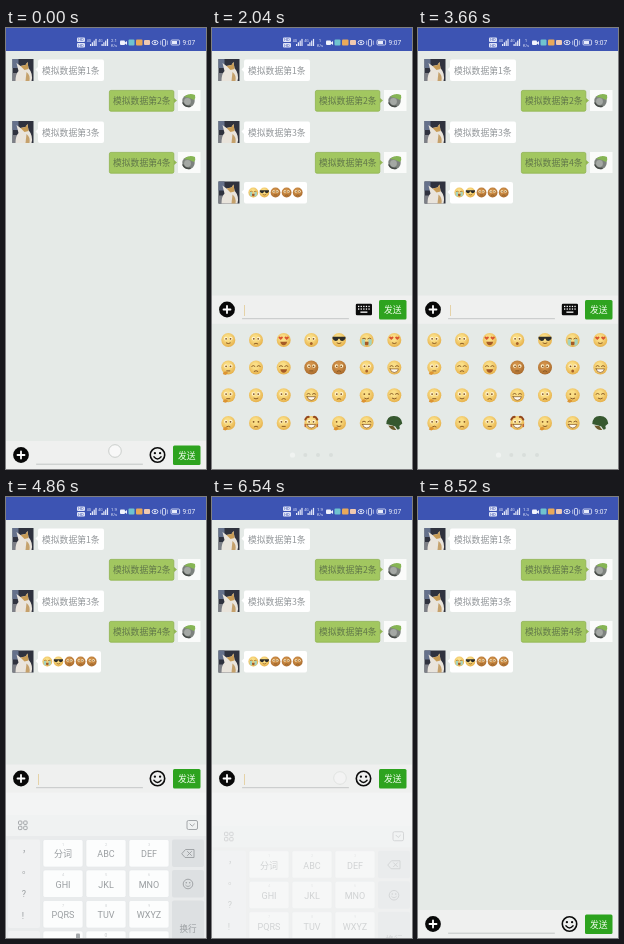
An HTML page that plays this animation: 200 px wide and 441 px high, repeating every 8580 ms.

```html
<!DOCTYPE html>
<html lang="zh-CN">
<head>
<meta charset="utf-8">
<title>聊天表情面板</title>
<style>
html, body { margin: 0; width: 100%; height: 100%; overflow: hidden; background: #e5eae7; }
svg { display: block; width: 200px; height: 441px; }
text { font-family: "Noto Sans CJK SC", "Noto Sans CJK", "Noto Sans", sans-serif; }
.num { font-family: Roboto, "Noto Sans", sans-serif; }
.key { font-family: Roboto, "Noto Sans CJK SC", "Noto Sans CJK", sans-serif; }
</style>
</head>
<body>
<svg id="stage" viewBox="0 0 200 441"></svg>
<script>
const LOOP = 8580;
const COLS = [16.3, 44, 71.7, 99.3, 127, 154.7, 182.3];
const ROWS = [312, 339.5, 367.3, 395];
const BAR_DROP = 145.5;

// Each panel change: start time and what fills the lower part.
const PANELS = [[0, 'none'], [180, 'keys'], [720, 'faces'], [2280, 'keys'], [3120, 'faces'],
  [4560, 'keys'], [5640, 'faces'], [6450, 'keys'], [7440, 'faces'], [8280, 'none']];
// Finger contacts: start, end, x, y.
const TAPS = [[0, 100, 109, 423], [600, 720, 151, 281], [1020, 1140, 154, 312], [1170, 1260, 127, 312],
  [1350, 1440, 99, 339], [1470, 1560, 127, 339], [1590, 1680, 127, 339], [1710, 1800, 181, 281],
  [2160, 2280, 151, 281], [3000, 3120, 151, 281], [4440, 4560, 151, 281],
  [5520, 5640, 151, 281], [6360, 6480, 128, 281], [7320, 7440, 151, 281], [8160, 8280, 100, 220]];
const TYPED = [1140, 1260, 1440, 1560, 1680];
const SENT = 1800;
const SPEED = [[0, '2.1'], [1000, '2.3'], [1900, '1'], [4300, '1.9'], [7000, '1.3']];

// Eyes, mouth, then optional extra for every cell of the emoji grid.
const GRID = [
  'ws wf hb wo gs cbT hs',
  'wnH cf cb wnB wfB wo ct',
  'wnH ws wf ct wf dsH cs',
  'wfH df wn wtM dsH ct dnC'
].map(r => r.split(' '));
const MESSAGE = ['cbT', 'gs', 'wnB', 'wfB', 'wfB'];

const rect = (x, y, w, h, fill, r = 0, more = '') =>
  `<rect x="${x}" y="${y}" width="${w}" height="${h}" rx="${r}" fill="${fill}" ${more}/>`;
const disc = (x, y, r, fill, more = '') => `<circle cx="${x}" cy="${y}" r="${r}" fill="${fill}" ${more}/>`;
const path = (d, fill, stroke = 'none', w = 1) =>
  `<path d="${d}" fill="${fill}" stroke="${stroke}" stroke-width="${w}" stroke-linecap="round"/>`;
const line = (d, color, w = 1) => path(d, 'none', color, w);
const text = (x, y, s, size, fill, more = '') =>
  `<text x="${x}" y="${y}" font-size="${size}" fill="${fill}" ${more}>${s}</text>`;
const mid = (x, y, s, size, fill, more = '') => text(x, y, s, size, fill, `text-anchor="middle" ${more}`);
const group = (id, body) => `<g id="${id}">${body}</g>`;

const INK = '#80521f';
const EYES = {
  d: disc(-2.4, -1.2, .9, INK) + disc(2.4, -1.2, .9, INK),
  c: line('M-4.3-1.2q1.6-1.6 3.2 0M1.1-1.2q1.6-1.6 3.2 0', INK, .9),
  w: disc(-2.5, -1.4, 1.8, '#fff3cf') + disc(2.5, -1.4, 1.8, '#fff3cf') +
    disc(-2.2, -1.2, .9, INK) + disc(2.2, -1.2, .9, INK),
  h: path('M-3 .1l-2.3-2.4q1-2 2.3-.4q1.5-1.6 2.3.4zM3 .1l-2.3-2.4q1-2 2.3-.4q1.5-1.6 2.3.4z', '#d9552f'),
  g: path('M-6.5-3.2H6.5V-1.4Q5.4 1 3.2 1Q1 1 .6-1.3H-.6Q-1 1-3.2 1Q-5.4 1-6.5-1.4z', '#2d2d2a')
};
const MOUTHS = {
  s: line('M-2 3q2 1.4 4 0', INK, .9),
  f: line('M-1.8 3.8q1.8-1.4 3.6 0', INK, .9),
  n: line('M-1.6 3.4h3.2', INK, .9),
  o: `<ellipse cy="3.5" rx="1.4" ry="1.6" fill="#a5602a"/>`,
  b: path('M-3.4 1.8h6.8q-.6 3.4-3.4 3.4t-3.4-3.4z', '#a55a26'),
  t: path('M-4.2 1.4h8.4q-.8 3.6-4.2 3.6t-4.2-3.6z', '#fffaf0', INK, .7)
};
const EXTRAS = {
  T: path('M-5-.8h3.2v6.6q-2 .2-3.2-1.6zM5-.8h-3.2v6.6q2 .2 3.2-1.6z', '#a4d3bf'),
  H: path('M-5.5 6.4q1-3 3.4-2.3l1.7 1q0 2-2.6 2.4z', '#dc9433'),
  M: line('M-6-3.5q1.5-3 3.5-2.6M6-3.5q-1.5-3-3.5-2.6', '#94471c', 2) + line('M-6 1.5v2M6 1.5v2', '#c26a35', 1.6),
  C: path('M-8 1Q-7.5-7.5 0-7Q7-7 8 .5L5 3Q6.5 7 3 6.5L1 3.5-2 2.5z', '#36582f') + path('M-6 2.5l5 .4 3 4q-5 1-8-4.4', '#6c5a2a')
};
function face(x, y, code, k = 1) {
  const [eye, mouth, extra] = code;
  const skin = extra === 'B' ? 'url(#brown)' : 'url(#gold)';
  const base = extra === 'C' ? '' : disc(0, 0, 7, skin) + EYES[eye] + MOUTHS[mouth];
  return `<g transform="translate(${x} ${y}) scale(${k})">${base}${EXTRAS[extra] || ''}</g>`;
}

function catPhoto(y) {
  return `<g transform="translate(6.5 ${y})">` + rect(0, 0, 21, 22, '#2f323e') + rect(0, 0, 6, 9, '#65718b') +
    rect(0, 14, 6, 8, '#7d7f86') + path('M3 22Q3 15 6 12L4 4l4 3 5-1 2-3 1 6q5 6 3 13z', '#e9e4dc') +
    path('M8 7l5-1 2-3 1 7-4 1z', '#c79b55') + path('M14 13q4 3 3 9h-4z', '#c5a16c') + '</g>';
}
function leafPhoto(y) {
  return rect(172, y, 22.5, 21, '#fafbfa') + disc(182.5, y + 11, 6.2, '#7d827e') + disc(181.5, y + 11.5, 3.4, '#a4a8a4') +
    line(`M177 ${y + 13}q2 4 7 3.4`, '#464b47', 1.6) +
    path(`M178 ${y + 7}q5-5 11-2q1 3-1 5q-5-3-10-3z`, '#86b554');
}
function leftRow(y, w, body) {
  return catPhoto(y) + path(`M32 ${y + 8}l-2.5 2.5 2.5 2.5z`, '#fff') + rect(32, y + .5, w, 21.5, '#fff', 2) + body;
}
function rightRow(y, label) {
  return leafPhoto(y) + path(`M168 ${y + 8}l3 2.5-3 2.5z`, '#94b955') +
    rect(103.4, y + .4, 64.4, 20.8, '#a2c760', 1.5, 'stroke="#8fb350" stroke-width=".8"') +
    text(107, y + 14, label, 8.8, '#62784a');
}
const label = n => `模拟数据第${n}条`;

function statusBar() {
  const hd = y => rect(71, y, 8, 4.6, '#dfe4f7', 1) + mid(75, y + 3.9, 'HD', 4, '#3d54b3', 'class="num"');
  const signal = x => mid(x + 2, 14, '4G', 3.5, '#e6eafa', 'class="num"') +
    [0, 1, 2, 3].map(i => rect(x + 3 + i * 1.8, 16 - i * 1.7, 1.2, 2 + i * 1.7, '#e6eafa')).join('');
  return rect(0, 0, 200, 23, '#3d54b3') + hd(9.5) + hd(15) + signal(81) + signal(92.5) +
    mid(108, 14, '', 4.4, '#e6eafa', 'id="speed" class="num"') + mid(108, 19, 'K/s', 4, '#e6eafa', 'class="num"') +
    rect(114, 12.5, 5, 4.5, '#f1f3fc', 1) + path('M119 14.5l2-1.5v4l-2-1.5z', '#f1f3fc') +
    rect(122.5, 11.5, 6, 6, '#6fc3cf', 1) + rect(130, 11.5, 6.5, 6, '#e9a95a', 1) + rect(138, 12, 6, 5, '#f0c9b0', 1) +
    `<ellipse cx="149" cy="14.6" rx="3" ry="2.1" fill="none" stroke="#e6eafa" stroke-width=".9"/>` + disc(149, 14.6, 1, '#e6eafa') +
    rect(156.5, 11.5, 3, 6.5, 'none', .6, 'stroke="#e6eafa" stroke-width=".8"') + line('M154.7 13v3.5M161.3 13v3.5', '#e6eafa', .7) +
    rect(165, 12, 8.6, 5, 'none', 1, 'stroke="#e6eafa" stroke-width=".8"') + rect(166, 13, 5, 3, '#e6eafa') +
    text(176.5, 17.3, '9:07', 6.6, '#f1f3fc', 'class="num"');
}

function smiley(x, y, r, color, w) {
  return disc(x, y, r, 'none', `stroke="${color}" stroke-width="${w}"`) +
    disc(x - r * .36, y - r * .25, r * .16, color) + disc(x + r * .36, y - r * .25, r * .16, color) +
    line(`M${x - r * .5} ${y + r * .25}q${r * .5} ${r * .6} ${r} 0`, color, w * .85);
}
function boardIcon() {
  let dots = '';
  for (let row = 0; row < 2; row++)
    for (let i = 0; i < 5; i++) dots += rect(146 + i * 2.6, 277.8 + row * 2.6, 1.3, 1.3, '#fff');
  return rect(143.8, 275.8, 16.2, 11.4, '#0b0b0b', 1.2) + dots + rect(148.4, 283.5, 7, 1.3, '#fff');
}
function inputBar() {
  return rect(0, 267.5, 200, 28, '#eff0ef') + disc(15, 281.5, 7.9, '#080808') +
    line('M11.5 281.5h7M15 278v7', '#fff', 1.8) + line('M30.5 290.7h106', '#b9bdbb', .8) +
    group('smile', smiley(151.5, 281.5, 7.2, '#0b0b0b', 1.6)) + group('board', boardIcon()) +
    rect(167, 272, 27.5, 19.5, '#2ea31f', 1.5) + mid(180.7, 285, '发送', 8.8, '#eefbea', 'font-weight="500"') +
    TYPED.map((t, i) => group('typed' + i, face(37.7 + i * 11, 282, MESSAGE[i], .7))).join('') +
    rect(32, 277, .9, 11, '#e4cf9f', 0, 'id="caret"');
}

function facePanel() {
  return rect(0, 295.5, 200, 146, '#e5eae7') + disc(154.5, 312, 13.8, '#ccd1d1', 'id="ripple"') +
    GRID.map((r, j) => r.map((c, i) => face(COLS[i], ROWS[j], c)).join('')).join('') +
    [80.5, 93.3, 106, 119].map((x, i) => disc(x, 427, i ? 2 : 2.6, i ? '#d9dedb' : '#f0f3f1')).join('');
}

function keyPanel() {
  const dim = '#9a9ea1', side = '#f0f1f2', dark = '#dde0e2';
  const edge = 'stroke="#e3e6e7" stroke-width=".6"';
  const names = ['分词', 'ABC', 'DEF', 'GHI', 'JKL', 'MNO', 'PQRS', 'TUV', 'WXYZ'];
  let keys = '';
  names.forEach((name, i) => {
    const x = 37 + (i % 3) * 43, y = 342.5 + Math.floor(i / 3) * 30.5;
    keys += rect(x, y, 40, 27.5, '#fcfdfd', 2, edge) + mid(x + 20, y + 17.8, name, 9, dim, 'class="key"') +
      mid(x + 20, y + 6, i + 1, 4, '#d0d3d5', 'class="num"');
  });
  [37, 80, 123].forEach(x => keys += rect(x, 434, 40, 28, '#fcfdfd', 2, edge));
  const marks = ['，', '。', '?', '!'].map((s, i) =>
    text(i < 2 ? 16 : 15.8, [355, 376, 400, 422][i], s, 9, dim, 'class="key"')).join('');
  const grid = [[12.5, 324], [17.7, 324], [12.5, 329.2], [17.7, 329.2]].map(([x, y]) =>
    rect(x, y, 3.4, 3.4, 'none', .8, `stroke="${dim}" stroke-width=".9"`)).join('');
  return rect(0, 318, 200, 150, '#f0f2f2') + rect(0, 339, 200, 130, '#e9ebec') + grid +
    rect(181, 323.5, 10.5, 9, 'none', 1.5, `stroke="${dim}" stroke-width=".9"`) + line('M184 327l2.2 2.2 2.2-2.2', dim, .9) +
    rect(2, 342.5, 32, 88.5, side, 2) + marks + rect(2, 434, 32, 28, side, 2) + keys +
    rect(70, 436.5, 4, 5, '#a4a8ab', 1) + mid(100, 440, '0', 5, '#c4c8ca', 'class="num"') +
    rect(166, 342.5, 32, 27.5, dark, 2) + rect(166, 373, 32, 27.5, dark, 2) + rect(166, 403.5, 32, 58, dark, 2) +
    path('M176 356.5l3.5-4h8.5v8h-8.5z', 'none', dim, .9) + line('M181.5 354.5l4 4M185.5 354.5l-4 4', dim, .9) +
    smiley(182, 387, 4.8, dim, .9) + mid(182, 435, '换行', 8.6, dim);
}

const shade = (id, a, b) =>
  `<radialGradient id="${id}" cx=".45" cy=".38" r=".62"><stop offset=".3" stop-color="${a}"/><stop offset="1" stop-color="${b}"/></radialGradient>`;

const stage = document.getElementById('stage');
stage.innerHTML = `<defs>${shade('gold', '#fade86', '#e6b04a')}${shade('brown', '#d2924a', '#a86a2c')}</defs>` +
  rect(0, 0, 200, 441, '#e5eae7') +
  [1, 3].map(n => leftRow(n * 31, 66, text(36, n * 31 + 15, label(n), 8.8, '#93979a'))).join('') +
  [2, 4].map(n => rightRow(n * 31, label(n))).join('') +
  group('sent', leftRow(153.5, 63, MESSAGE.map((c, i) => face(41.3 + i * 11.1, 164.5, c, .7)).join(''))) +
  rect(0, 295, 200, 146, '#f3f4f4', 0, 'id="base"') +
  group('keys', keyPanel()) + group('faces', facePanel()) + group('bar', inputBar()) + statusBar() +
  disc(0, 0, 6.3, '#fff', 'id="finger" fill-opacity=".55" stroke="#b9bdbb" stroke-width=".7"');

const el = {};
stage.querySelectorAll('[id]').forEach(n => el[n.id] = n);
const set = (id, attrs) => Object.entries(attrs).forEach(([k, v]) => el[id].setAttribute(k, v));
const show = (id, on) => set(id, { visibility: on ? 'visible' : 'hidden' });
const current = (table, t) => table.filter(row => row[0] <= t).pop();
const clamp = v => Math.max(0, Math.min(1, v));

function draw(t) {
  const [since, panel] = current(PANELS, t);
  const open = panel !== 'none';
  show('base', open);
  show('faces', panel === 'faces');
  show('keys', panel === 'keys');
  const p = clamp((t - since) / 240);
  set('keys', { opacity: p, transform: `translate(0 ${18 * (1 - p)})` });
  set('bar', { transform: `translate(0 ${open ? 0 : BAR_DROP})` });
  show('board', panel === 'faces');
  show('smile', panel !== 'faces');

  const sent = t >= SENT;
  show('sent', sent);
  const count = sent ? 0 : TYPED.filter(at => t >= at).length;
  TYPED.forEach((_, i) => show('typed' + i, i < count));
  show('caret', open);
  set('caret', { x: 32 + count * 11, fill: count ? '#8d9290' : '#e4cf9f' });

  // The emoji cell keeps its highlight a little after the finger lifts.
  const press = TAPS.slice(2, 7).find(tap => t >= tap[0] + 60 && t < tap[1] + 120);
  show('ripple', press && panel === 'faces');
  if (press) set('ripple', { cx: press[2], cy: press[3], opacity: clamp((press[1] + 150 - t) / 90) });

  const held = TAPS.filter(row => t >= row[0] && t < row[1] + 100).pop();
  show('finger', held);
  if (held) set('finger', { cx: held[2], cy: held[3], opacity: clamp((held[1] + 100 - t) / 100) });
  el.speed.textContent = current(SPEED, t)[1];
}

const start = performance.now();
function tick() {
  const t = (performance.now() - start) % LOOP;
  draw(Math.floor(t / 60) * 60);
  requestAnimationFrame(tick);
}
draw(0);
requestAnimationFrame(tick);
</script>
</body>
</html>
```
